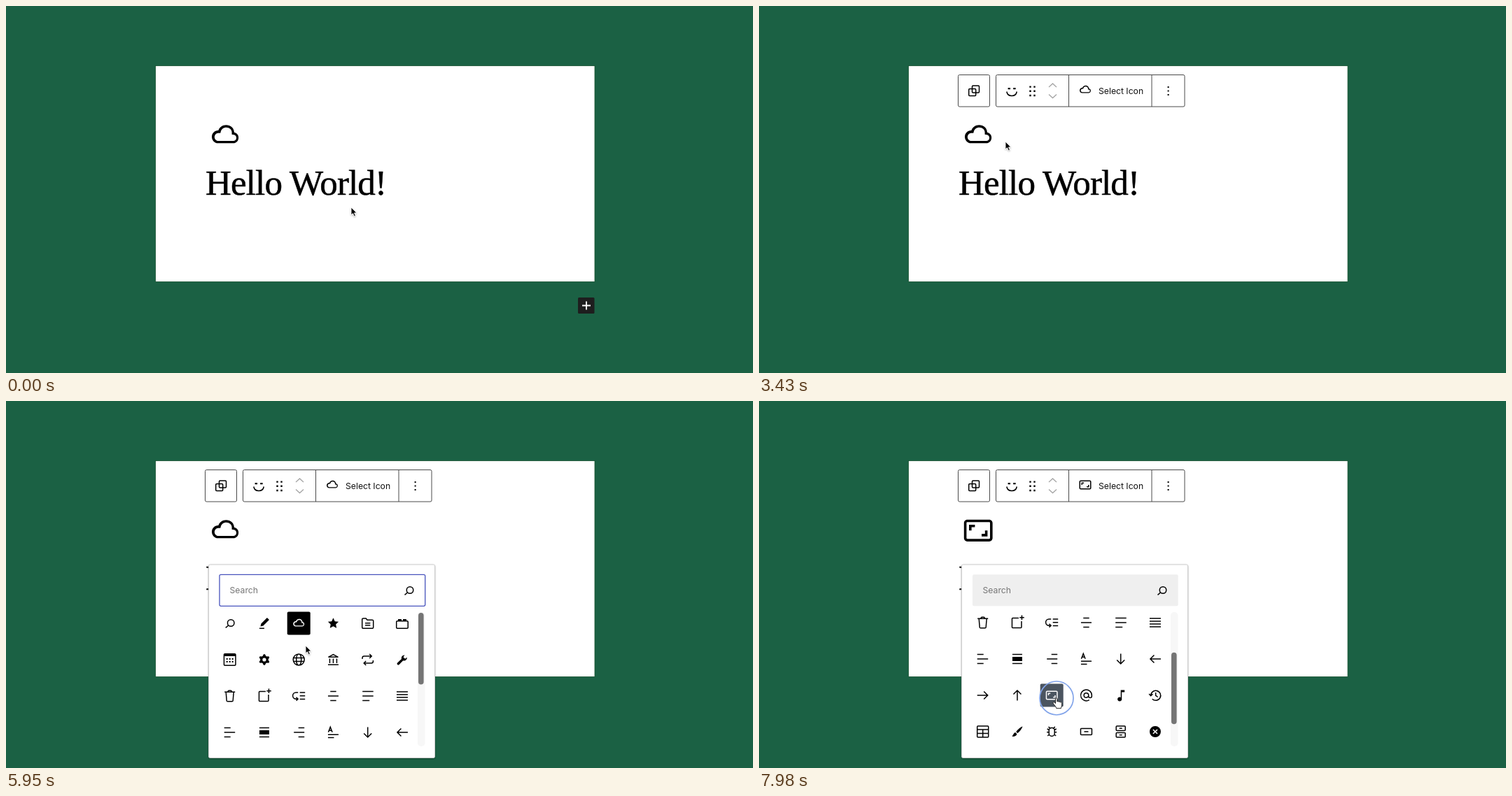
An HTML page for the animation above (8000 ms loop, 1067 px wide and 525 px high).

```html
<!DOCTYPE html>
<html lang="en">
<head>
<meta charset="utf-8">
<title>Icon picker</title>
<style>
  html, body { margin: 0; width: 100%; height: 100%; overflow: hidden; background: #1b6144; }
  svg { display: block; width: 100%; height: 100%; }
  text { font-family: Inter, "Open Sans", sans-serif; font-size: 12.2px; }
  .heading { font: 51px "Liberation Serif", serif; letter-spacing: -.85px; stroke: #000; stroke-width: .5; }
  .frame { fill: #fff; stroke: #4a4a4a; }
  .line { fill: none; stroke: currentColor; stroke-width: 1.5; }
  .solid { fill: currentColor; fill-rule: evenodd; }
</style>
</head>
<body>
<svg viewBox="0 0 1067 525" color="#000">
  <defs>
    <clipPath id="viewport"><rect x="300" y="301" width="288" height="194"/></clipPath>
    <filter id="shadow" x="-50%" y="-50%" width="200%" height="200%">
      <feDropShadow dx="0" dy="1" stdDeviation="1" flood-opacity=".3"/>
    </filter>
  </defs>
  <rect x="213.5" y="85.5" width="627.5" height="309" fill="#fff" stroke="#15502f" stroke-width=".8"/>
  <text class="heading" x="285" y="270">Hello World!</text>

  <g id="inserter">
    <rect x="817" y="417" width="23.5" height="23" rx="1.5" fill="#1e1e1e"/>
    <path d="M823 428.5h12M829 422.5v12" stroke="#fff" stroke-width="1.8"/>
  </g>

  <g id="toolbar">
    <rect class="frame" x="284.5" y="98.5" width="45" height="45.5" rx="2"/>
    <rect class="frame" x="338.5" y="98.5" width="269.5" height="45.5" rx="2"/>
    <path d="M442.5 98.5v45.5M561 98.5v45.5" stroke="#4a4a4a"/>
    <g class="line">
      <rect x="304.5" y="114" width="10" height="10" rx="1.2"/>
      <rect x="299.7" y="118.5" width="10" height="10" rx="1.2"/>
      <path d="M353.8 122.5c1.5 8 13 8 14.5 0"/>
      <path d="M414 116l5.5-5 5.5 5M414 126.5l5.5 5 5.5-5" stroke="#a5a5a5" stroke-width="1.3"/>
    </g>
    <path d="M355.6 118.2h3.4M363.2 118.2h3.4" stroke="#000" stroke-width="2.2"/>
    <path d="M387.5 114.4v15M393.5 114.4v15" stroke="#000" stroke-width="2.4" stroke-dasharray="2.4 3.8"/>
    <path d="M584.6 115v14" stroke="#000" stroke-width="2" stroke-dasharray="2 3.5"/>
    <text x="485" y="125.7" fill="#111">Select Icon</text>
  </g>

  <g id="popup">
    <rect x="289.5" y="234" width="323" height="276.5" rx="2" fill="#fff" stroke="#ccc" filter="url(#shadow)"/>
    <rect id="field" x="305" y="248.3" width="293.7" height="45" rx="2" stroke-width="1.3"/>
    <text x="319.5" y="275.3" fill="#757575">Search</text>
    <g clip-path="url(#viewport)"><g id="grid"></g></g>
    <rect x="588" y="302" width="10.5" height="192" rx="5" fill="#f7f7f7"/>
    <rect id="thumb" x="589" width="7.6" height="102.5" rx="3.8"/>
  </g>

  <circle id="ring" r="24" fill="none" stroke="#82a4ea" stroke-width="1.7"/>
  <path id="arrow" d="M0 0v11l2.5-2.3 1.9 4.2 2-.9-1.9-4h3.4z" fill="#000" stroke="#fff" stroke-width=".9" filter="url(#shadow)"/>
  <path id="hand" d="M-1.5 1c0-1.6 2.4-1.6 2.4 0v4.2c.6-1 2.2-.8 2.4.3.7-.8 2.1-.5 2.2.6.9-.6 2.1 0 2.1 1.2v2.6c0 2-1.2 2.6-1.2 4.8h-6.6c0-2-3-4.4-4.6-7.2-.8-1.6 1-2.4 2-1.2l1.3 1.4z" fill="#fff" stroke="#222"/>
</svg>
<script>
const $ = id => document.getElementById(id);

const gear = Array.from({ length: 24 }, (_, i) => {
  const radius = i % 4 < 2 ? 7.9 : 5.8, angle = (i - .5) * Math.PI / 12;
  return `${12 + radius * Math.sin(angle)} ${12 - radius * Math.cos(angle)}`;
}).join('L');

// Each icon lives in a 24-unit box: stroked path, then filled path after the bar.
const CLOUD = '|M17.3 10.1c0-2.5-2.1-4.4-4.8-4.4-2.2 0-4.1 1.4-4.6 3.3h-.2C5.7 9 4 10.7 4 12.8c0 2.1 1.7 3.8 3.7 3.8h9c1.8 0 3.2-1.5 3.2-3.3.1-1.6-1.1-2.9-2.6-3.2zm-.5 5.1h-9c-1.2 0-2.2-1.1-2.2-2.3s1-2.4 2.2-2.4h1.3l.3-1.1c.4-1.3 1.7-2.2 3.2-2.2 1.8 0 3.3 1.3 3.3 2.9v1.3l1.3.2c.8.1 1.4.9 1.4 1.8 0 1-.8 1.8-1.8 1.8z';
const RATIO = '|M18.5 5.5h-13c-1.1 0-2 .9-2 2v9c0 1.1.9 2 2 2h13c1.1 0 2-.9 2-2v-9c0-1.1-.9-2-2-2zm.5 11c0 .3-.2.5-.5.5h-13c-.3 0-.5-.2-.5-.5v-9c0-.3.2-.5.5-.5h13c.3 0 .5.2.5.5v9zM6.5 12H8v-2h2V8.5H6.5V12zm9.5 2h-2v1.5h3.5V12H16v2z';
const SEARCH = 'M18.25 11.5a4.75 4.75 0 1 1-9.5 0a4.75 4.75 0 1 1 9.5 0M10 15l-4 3.3';
const ICONS = [
  SEARCH,
  '|M19 7l-3-3-8.5 8.5-1 4 4-1L19 7zM12 18.5H5V20h7z',
  CLOUD,
  '|M12 4.3l2.3 4.9 5.3.6-3.9 3.7 1 5.3-4.7-2.6-4.7 2.6 1-5.3-3.9-3.7 5.3-.6z',
  'M4 6.5Q4 5 5.5 5h4l1.8 2.3h7.2q1.5 0 1.5 1.5v9q0 1.5-1.5 1.5h-13Q4 19.300 4 17.800zM8.300 11.800h7.400M8.300 14.800h7.400',
  '|M19 8h-1V6h-5v2h-2V6H6v2H5c-1.1 0-2 .9-2 2v8c0 1.1.9 2 2 2h14c1.1 0 2-.9 2-2v-8c0-1.1-.9-2-2-2zm.5 10c0 .3-.2.5-.5.5H5c-.3 0-.5-.2-.5-.5v-8c0-.3.2-.5.5-.5h14c.3 0 .5.2.5.5z',

  '|M19 3H5c-1.1 0-2 .9-2 2v14c0 1.1.9 2 2 2h14c1.1 0 2-.9 2-2V5c0-1.1-.9-2-2-2zm.5 16c0 .3-.2.5-.5.5H5c-.3 0-.5-.2-.5-.5V7h15zM7 10h2v2H7zM11 10h2v2h-2zM15 10h2v2h-2zM7 14h2v2H7zM11 14h2v2h-2zM15 14h2v2h-2z',
  `|M${gear}zM14.600 12a2.600 2.600 0 1 0-5.200 0a2.600 2.600 0 1 0 5.200 0z`,
  'M20 12a8 8 0 1 1-16 0a8 8 0 1 1 16 0M15.500 12c0 10.600-7 10.600-7 0s7-10.600 7 0M4.500 9.500h15M4.500 14.500h15',
  'M5 8.300l7-3.600 7 3.600zM7 10.400V17M12 10.400V17M17 10.400V17M4.500 19.200h15',
  'M4.300 11V9.500Q4.300 7 6.800 7H17M14.500 4l3 3-3 3M19.700 13v1.500q0 2.500-2.500 2.500H7M9.500 14l-3 3 3 3',
  '|M5.200 16.400l5.800-5.400c-.7-2.600 1.300-5.600 4.600-5.400l-2.100 2.600 2.600 2.600 2.600-2.100c.6 3.300-2.600 5.400-5.400 4.600l-5.600 5.800a1.800 1.800 0 1 1-2.500-2.700z',

  'M4.500 6.300h15M6.500 6.500l1 12q.1 1.200 1.200 1.200h6.600q1.100 0 1.200-1.200l1-12M9.500 6v-.8q0-1 1-1h3q1 0 1 1V6',
  'M14 5.500H5.500q-1 0-1 1v12q0 1 1 1H17q1 0 1-1V10M18.500 1.500v6.500M15.300 4.700h6.500',
  'M11 7H8a4.600 4.600 0 0 0 0 9.200h2.500M8.300 13.800l2.600 2.400-2.600 2.400M13.500 7H21M13.500 11.700H21M13.500 16.400H21',
  'M7.800 5.500h8.400M4.500 12h15M7.800 18.500h8.400',
  'M4.500 5.500h15.500M4.500 12H20M4.500 18.500h10',
  'M4 6h16M4 10h16M4 14h16M4 18h16',

  'M4 5.500h9M4 12h15.500M4 18.500h9',
  'M5 5.500h14M5 18.500h14|M5 9h14v6H5z',
  'M11.500 5.500H20M5 12h15M11.500 18.500H20',
  'M5 11.800l2.800-7.500 2.800 7.500M6 9.300h3.600M4.500 15.300h15M4.500 19.500H13',
  'M12 4.500V19M6.500 13.500L12 19l5.500-5.500',
  'M20 12H5M10.500 6.500L5 12l5.500 5.500',

  'M4 12h15M13.500 6.500L19 12l-5.500 5.500',
  'M12 19.500V5M6.500 10.500L12 5l5.500 5.500',
  RATIO,
  'M15.300 12a3.300 3.300 0 1 1-6.600 0a3.300 3.300 0 1 1 6.600 0v1.200a2.300 2.300 0 0 0 4.600 0V12a7.900 7.900 0 1 0-3.600 6.600',
  '|M12 15V4.500h5.500v3h-4V17a3.100 3 0 1 1-1.500-2z',
  'M5.800 13a7 7 0 1 1 2 4.200M3.200 10l2.500 2.800 2.800-2.500M12.700 8v4.300l3 2.200',

  'M5 4h14q1 0 1 1v14q0 1-1 1H5q-1 0-1-1V5q0-1 1-1zM4 9h16M4 14.500h16M12 9v11',
  '|M19.500 4.500c-3 1-7 4.500-9.200 7.800l2 2c3.200-2.400 6.400-6.600 7.200-9.800zM9.400 13.200c-2.400 0-2.600 2.600-5 5.600 3.600.4 6.600-.6 7-3.600z',
  'M8 10.500a4 4 0 0 1 8 0v4a4 4 0 0 1-8 0zM9.300 7.500L7.500 4.800M14.700 7.500l1.800-2.700M8 9.500L5.500 8M16 9.500L18.500 8M8 12.700H5M16 12.700h3M8.500 16L6 18M15.500 16l2.500 2',
  'M5 7.500h14q1 0 1 1v7q0 1-1 1H5q-1 0-1-1v-7q0-1 1-1zM9 12h6',
  'M6.500 4h11q1 0 1 1v4.500q0 1-1 1h-11q-1 0-1-1V5q0-1 1-1zM6.500 13.500h11q1 0 1 1V19q0 1-1 1h-11q-1 0-1-1v-4.500q0-1 1-1zM10 7.300h4M10 16.800h4',
  '|M20 12a8 8 0 1 1-16 0a8 8 0 1 1 16 0zM8.400 9.500l1.100-1.100 2.500 2.500 2.500-2.500 1.100 1.100-2.500 2.500 2.500 2.500-1.100 1.100-2.500-2.500-2.500 2.500-1.100-1.100 2.500-2.500z'
];

function icon(paths, x, y, scale = 1, name = '') {
  const [line, solid = ''] = paths.split('|');
  return `<g class="${name}" transform="translate(${x} ${y}) scale(${scale}) translate(-12 -12)">
    <path class="line" d="${line}"/><path class="solid" d="${solid}"/></g>`;
}
const add = (id, markup) => $(id).insertAdjacentHTML('beforeend', markup);

add('toolbar', icon(CLOUD, 466, 120, 1, 'before') + icon(RATIO, 466, 120, 1, 'after'));
$('toolbar').insertAdjacentHTML('beforebegin',
  icon(CLOUD, 313.2, 185.3, 2.4, 'before') + icon(RATIO, 313.2, 185.3, 2.4, 'after'));
add('popup', icon(SEARCH, 575.5, 271));
ICONS.forEach((paths, i) => {
  const x = 319.7 + i % 6 * 49.25, y = 318 + Math.floor(i / 6) * 52;
  add('grid', `<g id="cell${i}"><rect x="${x - 16.5}" y="${y - 16.5}" width="33" height="33" rx="2" fill="none"/>${icon(paths, x, y)}</g>`);
});

const CURSOR = [ // time, x, y
  [0, 493, 288], [420, 655, 299], [700, 719, 285], [910, 680, 226], [1330, 480, 224],
  [1540, 480, 224], [2030, 382, 212], [2170, 378, 209], [2450, 320, 186], [3080, 320, 186],
  [3430, 352, 194], [3780, 320, 184], [5040, 320, 184], [5740, 428, 350],
  [7140, 428, 350], [7630, 425, 425], [8000, 425, 425]
];
const CLICKS = [2450, 3990, 7770];
const TOOLBAR_AT = 2520, POPUP_AT = 4060, HOVER_AT = 5600, HAND_AT = 7490, BLUR_AT = 7770, PICK_AT = 7840;

const smooth = (t, from, to) => {
  const u = Math.min(1, Math.max(0, (t - from) / (to - from)));
  return u * u * (3 - 2 * u);
};
function cursorAt(t) {
  const i = CURSOR.findIndex(key => key[0] > t);
  const [t0, x0, y0] = CURSOR[i - 1], [t1, x1, y1] = CURSOR[i];
  const u = smooth(t, t0, t1);
  return [x0 + (x1 - x0) * u, y0 + (y1 - y0) * u];
}
const show = (el, on) => el.style.display = on ? '' : 'none';
const set = (id, attrs) => Object.entries(attrs).forEach(([key, value]) => $(id).setAttribute(key, value));
function highlight(index, color) {
  const cell = $('cell' + index);
  cell.firstChild.setAttribute('fill', color || 'none');
  cell.style.color = color ? '#fff' : '';
}

function draw() {
  const t = Math.floor(performance.now() % 8000 / 70) * 70;
  const picked = t >= PICK_AT, hand = t >= HAND_AT, blurred = t >= BLUR_AT;
  const scroll = 105 * smooth(t, 6090, 6933);
  const move = `translate(${cursorAt(t).join(' ')})`;

  show($('inserter'), t < TOOLBAR_AT);
  show($('toolbar'), t >= TOOLBAR_AT);
  show($('popup'), t >= POPUP_AT);
  document.querySelectorAll('.before').forEach(el => show(el, !picked));
  document.querySelectorAll('.after').forEach(el => show(el, picked));
  highlight(2, picked ? '' : '#000');
  highlight(26, picked ? '#4b5560' : '');

  set('field', { fill: blurred ? '#efefef' : '#fff', stroke: blurred ? 'none' : '#4853bd' });
  set('grid', { transform: `translate(0 ${-scroll})` });
  set('thumb', { y: 303 + scroll * .54, fill: t < HOVER_AT ? '#c2c2c2' : '#757575' });

  for (const id of ['ring', 'arrow', 'hand']) set(id, { transform: move });
  show($('ring'), CLICKS.some(start => t >= start && t < start + 280));
  show($('arrow'), !hand);
  show($('hand'), hand);
  requestAnimationFrame(draw);
}
draw();
</script>
</body>
</html>
```
